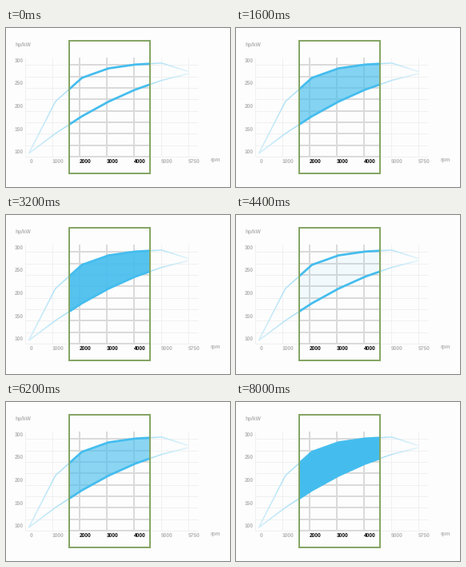
A matplotlib script that plays this animation: 280x199 px, repeating every 8.2 s.

```python
import numpy as np
import matplotlib.pyplot as plt
from matplotlib.animation import FuncAnimation
from matplotlib.collections import LineCollection
from matplotlib.colors import to_rgb
from matplotlib.patches import Rectangle

W, H, DPI = 280, 199, 100
FRAMES, STEP = 41, 200
PULSES = 3.5  # from empty at the start to full at the end of the loop
PT = 72 / DPI  # points per pixel

BLUE, GREEN, GREY = "#44bdee", "#85a565", "#b3b3b3"
GRID, FAINT, PAPER = "#dadada", "#f0f0f0", "#fdfdfd"
LEFT, RIGHT, TOP, BOTTOM = 78.5, 179.5, 16, 182

plt.rcParams["text.hinting"] = "none"
fig = plt.figure(figsize=(W / DPI, H / DPI), dpi=DPI, facecolor=PAPER)
ax = fig.add_axes([0, 0, 1, 1])
ax.set_xlim(0, W)
ax.set_ylim(H, 0)
ax.axis("off")

box = ax.add_patch(Rectangle((LEFT, TOP), RIGHT - LEFT, BOTTOM - TOP,
                             fill=False, ec=GREEN, lw=2 * PT, zorder=7))


def label(x, y, text, color=GREY, ha="center"):
    ax.text(x, y, text, color=color, ha=ha, va="center_baseline", zorder=6,
            fontsize=6.6 * PT, family="Liberation Sans", weight="bold")


def grid(xs, ys, strong):
    ax.plot(xs, ys, color=GRID if strong else FAINT,
            lw=(2 if strong else 1) * PT, zorder=2 if strong else 1,
            solid_capstyle="butt")


def faded(xs, ys):
    """Thin line that pales towards both ends."""
    fine = np.linspace(xs[0], xs[-1], 120)
    pts = np.column_stack([fine, np.interp(fine, xs, ys)])
    tint = np.interp(fine[:-1], [xs[0], LEFT, RIGHT, xs[-1]],
                     [0.25, 0.5, 0.5, 0.15])[:, None]
    colors = tint * to_rgb(BLUE) + (1 - tint) * to_rgb(PAPER)
    ax.add_collection(LineCollection(np.stack([pts[:-1], pts[1:]], axis=1),
                                     colors=colors, lw=1.5 * PT, zorder=4))


# Grid: faint everywhere, stronger inside the box
cols = 24 + 34 * np.arange(7)
for y in 46.3 + 14.35 * np.arange(9):
    grid([24, 240], [y, y], False)
    grid([LEFT, RIGHT], [y, y], True)
for x in cols:
    grid([x, x], [37, 161], LEFT < x < RIGHT)

# Power curves, one knot per column
k = np.arange(7)
knots = np.linspace(28.5, 228, 7)
upper = 42.6 + 49.4 * 0.4 ** (k - 1.0)
upper[0], upper[-1] = 157, 54.5
lower = 157 - 26.6 * k + 1.66 * k ** 2

area = ax.fill_between(knots, upper, lower, color=BLUE, lw=0, zorder=3)
area.set_clip_path(box)
for ys in (upper, lower):
    faded(knots, ys)
    bold, = ax.plot(knots, ys, color=BLUE, lw=2.7 * PT, zorder=5)
    bold.set_clip_path(box)

label(11.3, 20.5, "hp/kW", ha="left")
for i in range(5):
    label(21.5, 40 + 28.7 * i, str(300 - 50 * i), ha="right")
for i, x in enumerate(cols):
    label(x + 7.3, 166.7, str(min(1000 * i, 5750)),
          "black" if LEFT < x < RIGHT else GREY)
label(262, 165.5, "rpm")


def update(i):
    area.set_alpha((1 - np.cos(2 * np.pi * PULSES * i / (FRAMES - 1))) / 2)
    return area,


anim = FuncAnimation(fig, update, frames=FRAMES, interval=STEP,
                     repeat=True, repeat_delay=0, blit=False)
plt.show()
```
